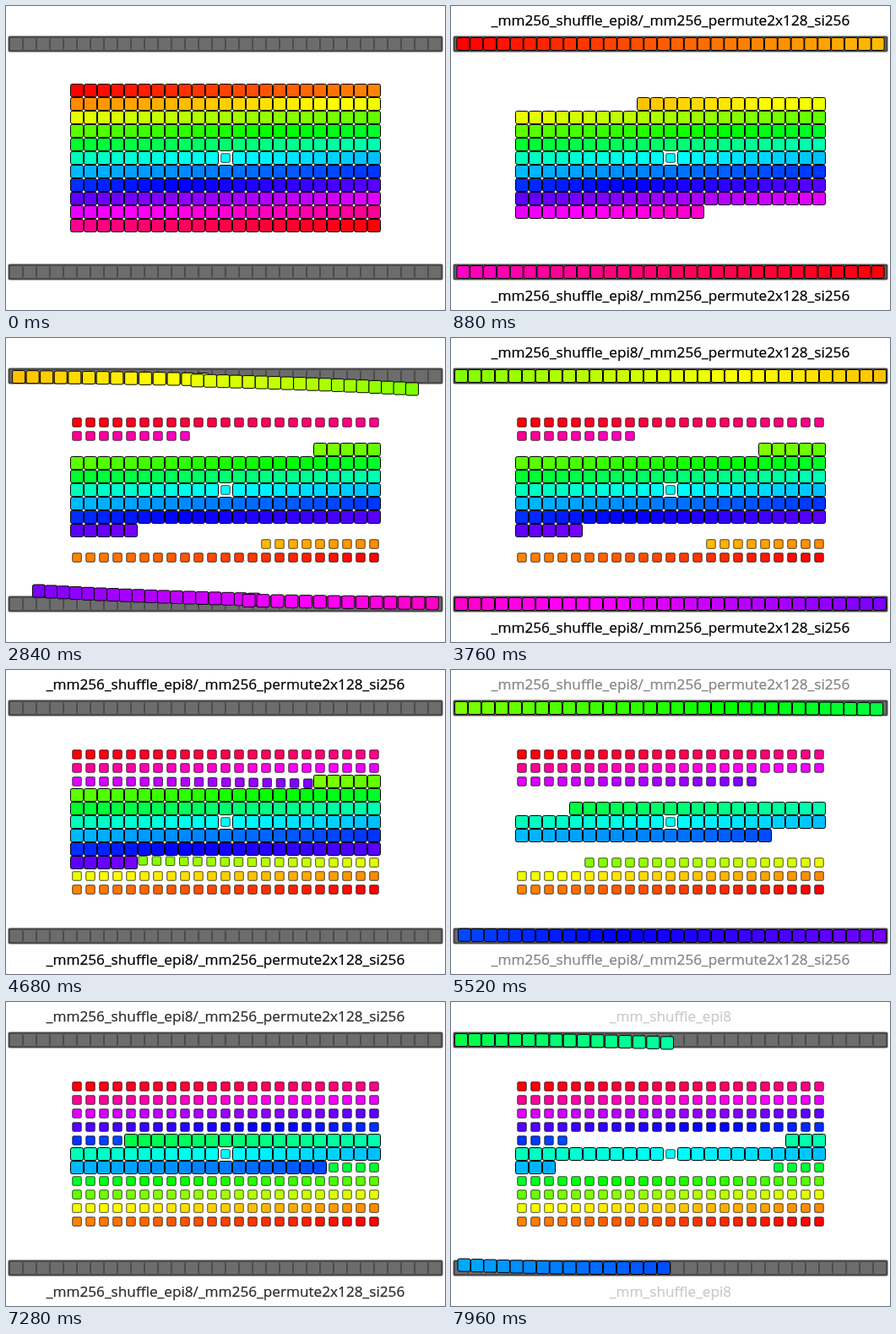
These frames come from a looping animation (520 px wide and 360 px high, 8000 ms). An HTML page with a canvas:

```html
<!DOCTYPE html>
<html lang="en">
<head>
<meta charset="utf-8">
<title>Reversing an array with vector registers</title>
<style>
  html, body { margin: 0; width: 100%; height: 100%; overflow: hidden; background: #fff; }
  canvas { display: block; }
</style>
</head>
<body>
<canvas id="stage" width="520" height="360"></canvas>
<script>
const ctx = document.getElementById('stage').getContext('2d');

const LOOP = 8000, CYCLE = 2500, PHASE = CYCLE / 3;
const COLS = 23, COUNT = 253, CELL = 16, SLOTS = 32;
const TOP_Y = 45, BOTTOM_Y = 315, SMALL = 0.7;
const WIDE = '_mm256_shuffle_epi8/_mm256_permute2x128_si256';
const NARROW = '_mm_shuffle_epi8';
const batches = [
  { start: 0, size: 32, label: WIDE },
  { start: 32, size: 32, label: WIDE },
  { start: 64, size: 32, label: WIDE },
  { start: 96, size: 16, label: NARROW }
];

const clamp = x => Math.min(1, Math.max(0, x));
const lerp = (a, b, p) => a + (b - a) * p;
const mix = (a, b, p) => ({ x: lerp(a.x, b.x, p), y: lerp(a.y, b.y, p) });

// Closed form of cubic-bezier(1, 0, 0, 1)
function ease(t) {
  const v = Math.cbrt((clamp(t) - 0.5) / 4);
  return 0.5 + 1.5 * v - 2 * v ** 3;
}

const home = i => ({ x: 84 + CELL * (i % COLS), y: 100 + CELL * Math.floor(i / COLS) });
const slot = (k, y) => ({ x: 12 + CELL * k, y });

function box(x, y, scale, fill, stroke) {
  ctx.save();
  ctx.translate(x, y);
  ctx.scale(scale, scale);
  ctx.beginPath();
  ctx.roundRect(-7.5, -7.5, 15, 15, 2);
  ctx.fillStyle = fill;
  ctx.strokeStyle = stroke;
  ctx.lineWidth = 1;
  ctx.fill();
  ctx.stroke();
  ctx.restore();
}

function drawRegister(y) {
  ctx.beginPath();
  ctx.roundRect(3.5, y - 8.5, 513, 17, 1);
  ctx.fillStyle = '#666';
  ctx.strokeStyle = '#484848';
  ctx.lineWidth = 2;
  ctx.fill();
  ctx.stroke();
  for (let k = 0; k < SLOTS; k++) box(12 + CELL * k, y, 1, '#6c6c6c', '#4c4c4c');
}

function pose(i, time) {
  const mirror = COUNT - 1 - i;
  const low = Math.min(i, mirror);
  const from = home(i);
  if (i === mirror) return { ...from, scale: SMALL };

  const index = batches.findIndex(b => low >= b.start && low < b.start + b.size);
  const local = time - index * CYCLE;
  if (index < 0 || local <= 0) return { ...from, scale: 1 };

  const { start, size } = batches[index];
  const k = low - start;
  const isTop = i < mirror;
  const y = isTop ? TOP_Y : BOTTOM_Y;
  const ahead = slot(k, y), behind = slot(size - 1 - k, y);
  const loaded = isTop ? ahead : behind;
  const reversed = isTop ? behind : ahead;
  const travel = PHASE * (0.5 + 0.25 * k / size);

  if (local < PHASE) return { ...mix(from, loaded, ease(local / travel)), scale: 1 };
  if (local < 2 * PHASE) {
    return { ...mix(loaded, reversed, ease((local - PHASE) / (PHASE / 2))), scale: 1 };
  }
  const stored = local - 2 * PHASE;
  return {
    ...mix(reversed, home(mirror), ease(stored / travel)),
    scale: lerp(1, SMALL, clamp(stored / (PHASE / 2)))
  };
}

function drawLabels(time) {
  const local = time % CYCLE;
  const fade = 0.28 * PHASE;
  const shown = clamp((local - 0.5 * PHASE) / fade);
  const hidden = clamp((local - 2.68 * PHASE) / fade);
  ctx.globalAlpha = shown - hidden;
  ctx.fillStyle = ctx.strokeStyle = '#000';
  ctx.lineWidth = 0.25;
  ctx.font = '17.2px "Open Sans", "Noto Sans", sans-serif';
  ctx.textAlign = 'center';
  const { label } = batches[Math.floor(time / CYCLE)];
  for (const y of [22.5, 348.5]) {
    ctx.fillText(label, 260, y);
    ctx.strokeText(label, 260, y);
  }
  ctx.globalAlpha = 1;
}

function draw(now) {
  const time = now % LOOP;
  ctx.fillStyle = '#fff';
  ctx.fillRect(0, 0, 520, 360);
  drawRegister(TOP_Y);
  drawRegister(BOTTOM_Y);
  for (let i = 0; i < COUNT; i++) {
    const { x, y, scale } = pose(i, time);
    box(x, y, scale, `hsl(${360 * i / COUNT} 100% 50%)`, '#000');
  }
  drawLabels(time);
}

let origin;
function tick(now) {
  origin ??= now;
  draw(now - origin);
  requestAnimationFrame(tick);
}
requestAnimationFrame(tick);
</script>
</body>
</html>
```
